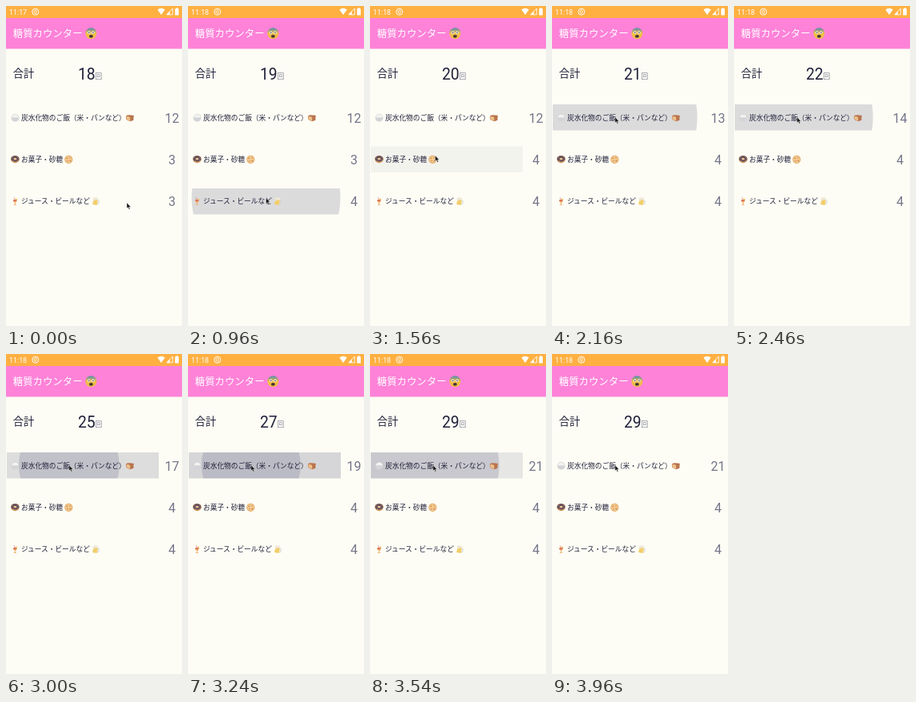
An HTML page for the animation above (4200 ms loop, 220x400 px).

```html
<!DOCTYPE html>
<html lang="ja">
<head>
<meta charset="utf-8">
<style>
  html, body { margin: 0; width: 100%; height: 100%; overflow: hidden; background: #fdfdf5; }
  svg { display: block; width: 220px; height: 400px; }
  text { font-family: "Noto Sans CJK JP", "Noto Sans CJK", sans-serif; fill: #20203a; }
  .num { font-family: Roboto, sans-serif; }
  .label { font-size: 8.7px; }
  .count { font-size: 16px; fill: #74748a; text-anchor: middle; }
  .white { fill: #fff; }
</style>
</head>
<body>
<svg viewBox="0 0 220 400">
  <defs>
    <clipPath id="clip0"><rect x="1" y="123" width="190" height="32.5"/></clipPath>
    <clipPath id="clip1"><rect x="1" y="175.5" width="190" height="32.5"/></clipPath>
    <clipPath id="clip2"><rect x="1" y="228" width="190" height="32.5"/></clipPath>
    <linearGradient id="fear" x2="0" y2="1">
      <stop offset=".05" stop-color="#5f8fa8"/>
      <stop offset=".5" stop-color="#f0bd45"/>
    </linearGradient>
  </defs>
  <rect width="220" height="400" fill="#fdfdf5"/>
  <rect width="220" height="15" fill="#ffb041"/>
  <rect y="15" width="220" height="38.5" fill="#fd82d8"/>

  <!-- Status bar -->
  <text id="clock" class="num white" x="4" y="10.7" font-size="8.9"></text>
  <g fill="none" stroke="#fff">
    <circle cx="36.8" cy="7.2" r="4"/>
    <path d="M38.6 5.8A2 2 0 1 0 38.2 8.8M36.8 7.2H38.8" stroke-width=".9"/>
  </g>
  <g fill="#fff">
    <path d="M189.3 4.6Q194 1 198.7 4.6L194 11Z"/>
    <path d="M208.3 3V10.8H200.8Z" fill="none" stroke="#fff" stroke-width=".9"/>
    <path d="M204.8 6.6V10.8H200.8Z"/>
    <path d="M211.3 3.2h1.3v-1h2v1h1.3v8.2h-4.6z"/>
  </g>

  <text class="white" x="8.8" y="38.6" font-size="12.4">糖質カウンター</text>
  <g transform="translate(106.3 34.2)">
    <circle r="7" fill="url(#fear)"/>
    <g fill="#fff"><circle cx="-2.6" cy="-1" r="1.7"/><circle cx="2.6" cy="-1" r="1.7"/></g>
    <g fill="#453735"><circle cx="-2.6" cy="-.8" r=".8"/><circle cx="2.6" cy="-.8" r=".8"/>
      <ellipse cy="3.6" rx="2.5" ry="1.9"/></g>
  </g>

  <text x="8.8" y="88.8" font-size="13.3">合計</text>
  <text id="total" class="num" x="90" y="91.7" font-size="19.3"></text>
  <text x="111.3" y="91.3" font-size="9" style="fill:#85859a">回</text>

  <g id="ripples" fill="#46466e"></g>

  <text class="label" x="19" y="143">炭水化物のご飯（米・パンなど）</text>
  <text class="label" x="19" y="195">お菓子・砂糖</text>
  <text class="label" x="19" y="247.3">ジュース・ビールなど</text>
  <g id="counts"></g>

  <!-- Rice and bread -->
  <g transform="translate(11.5 139.8)">
    <path d="M-4.7 0Q-4-4.6 0-4.6T4.7 0Z" fill="#f2f2f0" stroke="#cbcbcb" stroke-width=".6"/>
    <path d="M-5 0H5Q4.5 4.8 0 4.8T-5 0" fill="#d2d4d8"/>
  </g>
  <g transform="translate(154.8 139.8)">
    <path d="M-5-1.6Q-4.5-3.8-1-3.6L4.6-3Q5.6-1.5 4.6-.6V3L.4 4.4-4.4 2.2Z" fill="#b9744d"/>
    <path d="M-4.4-1.6Q-2-2.4.4-.6V4L-4.1 2Z" fill="#efc08a"/>
  </g>
  <!-- Doughnut and cookie -->
  <g transform="translate(11.4 191.6)">
    <ellipse rx="5.3" ry="4.6" fill="#cf9358"/>
    <ellipse cy="-.7" rx="5" ry="3.7" fill="#665058"/>
    <ellipse cy="-.4" rx="1.9" ry="1.1" fill="#f3d29c"/>
    <path d="M-3.4-1.6l1-.7M2.4-2.5l1 .6M-2.4 1.6l1 .4M2.4 1.4l1-.6" stroke="#d7a3ad" stroke-width=".6"/>
  </g>
  <g transform="translate(78.3 191.8)">
    <circle r="5.1" fill="#e3a763"/>
    <circle r="4.2" fill="#f5ca8e"/>
    <g fill="#c08655"><circle cx="-2" cy="-1.5" r=".9"/><circle cx="1.7" cy="-2" r=".8"/>
      <circle cx="2" cy="1.7" r=".9"/><circle cx="-1.3" cy="2" r=".8"/></g>
  </g>
  <!-- Cocktail and beer -->
  <g transform="translate(11.3 244)">
    <path d="M-2.2-1.8H2.2Q2.4 1.4.5 2V4.2H1.7V4.9H-1.7V4.2H-.5V2Q-2.4 1.4-2.2-1.8" fill="#efb06a"/>
    <path d="M-2.2-1.8H2.2L2 0H-2Z" fill="#dc6a58"/>
    <path d="M.2-1.8L-1.4-4.8" stroke="#d8807c" stroke-width=".8"/>
    <circle cx="1.7" cy="-2.4" r="1" fill="#f0c860"/>
  </g>
  <g transform="translate(112 244) rotate(12)">
    <path d="M2.5-1H4.3V2.8H2.5" fill="none" stroke="#cfd3d4" stroke-width=".9"/>
    <path d="M-3-2.2H2.6V4.6H-3Z" fill="#f2cd69"/>
    <path d="M-3.8-1V-3.2Q-3-5-.5-4.4 3.2-4.8 3.2-1.6H-1.4V.2H-2.8V-1Z" fill="#eee8d8"/>
  </g>

  <path id="cursor" d="M0 0V7L1.6 5.6 2.8 8.3 4 7.7 2.8 5.2H5Z" fill="#111" stroke="#fff" stroke-width=".4"/>
</svg>
<script>
const LOOP = 4200, TICK = 60;
const rowY = [139.5, 191.7, 244];
const startCounts = [12, 3, 3];
// [time, row]
const taps = [
  [805, 2], [1245, 1], [1980, 0], [2300, 0], [2576, 0], [2790, 0],
  [2915, 0], [3030, 0], [3157, 0], [3285, 0], [3410, 0]
];
// [start, end, x, y]
const moves = [[0, 0, 151, 246], [0, 300, 97.5, 240], [1080, 1240, 81.5, 187], [1660, 1920, 78.8, 139]];

const byId = id => document.getElementById(id);
const clamp = v => Math.max(0, Math.min(1, v));
const ease = v => v * v * (3 - 2 * v);

function add(parent, tag, attrs) {
  const el = document.createElementNS("http://www.w3.org/2000/svg", tag);
  for (const key in attrs) el.setAttribute(key, attrs[key]);
  return byId(parent).appendChild(el);
}

function cursorAt(t) {
  let [, , x, y] = moves[0];
  for (const [start, end, toX, toY] of moves.slice(1)) {
    const p = ease(clamp((t - start) / (end - start)));
    x += (toX - x) * p;
    y += (toY - y) * p;
  }
  return [x, y];
}

const countEls = rowY.map(y => add("counts", "text", { class: "num count", x: 207.6, y: y + 6.1 }));
const ripples = taps.map(([time, row]) => {
  const [cx, cy] = cursorAt(time);
  const group = add("ripples", "g", { "clip-path": `url(#clip${row})` });
  const circle = add("ripples", "circle", { cx, cy });
  group.appendChild(circle);
  return { time, row, circle };
});

function render(t) {
  const counts = [...startCounts];
  for (const { time, row, circle } of ripples) {
    const age = t - time;
    if (age >= 0) counts[row]++;
    const live = age >= 0 && age < 375;
    circle.setAttribute("r", live ? 10 + 106 * Math.pow(clamp(age / 215), .75) : 0);
    circle.setAttribute("opacity", .19 * (1 - clamp((age - 200) / 160)));
  }
  countEls.forEach((el, i) => el.textContent = counts[i]);
  byId("total").textContent = counts.reduce((a, b) => a + b);
  byId("clock").textContent = t < 60 ? "11:17" : "11:18";
  byId("cursor").setAttribute("transform", `translate(${cursorAt(t)})`);
}

const origin = performance.now();
function frame() {
  const t = (performance.now() - origin) % LOOP;
  render(Math.floor(t / TICK) * TICK);
  requestAnimationFrame(frame);
}
render(0);
requestAnimationFrame(frame);
</script>
</body>
</html>
```
